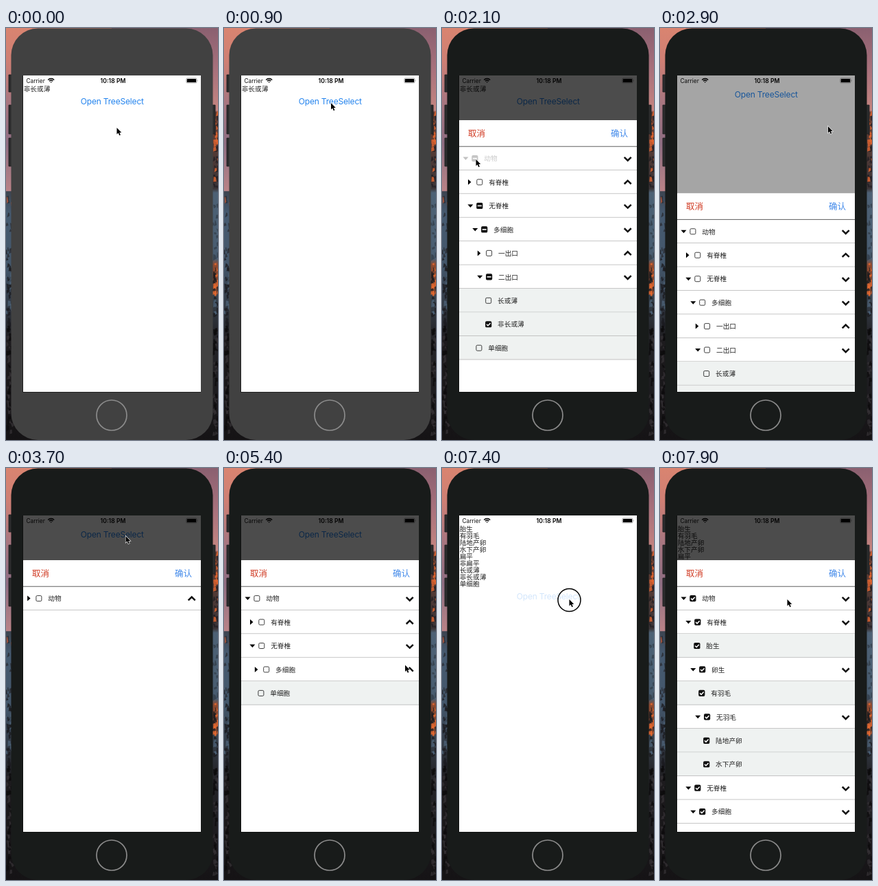
An HTML page that plays this animation: 309 px wide and 599 px high, repeating every 8000 ms.

```html
<!DOCTYPE html>
<html lang="zh-CN">
<head>
<meta charset="utf-8">
<title>TreeSelect</title>
<style>
  html, body { margin: 0; width: 100%; height: 100%; overflow: hidden; background: #1b1a1c; }
  svg { display: block; width: 309px; height: 599px; }
  text { font-family: "Noto Sans CJK SC", "Noto Sans CJK", sans-serif; white-space: pre; }
  .ui { font-family: Inter, "Liberation Sans", sans-serif; }
  .name { font-size: 9.66px; fill: #222; }
  .head { font-size: 12.5px; }
</style>
</head>
<body>
<svg viewBox="0 0 309 599" xmlns="http://www.w3.org/2000/svg">
  <defs>
    <clipPath id="screen"><rect x="25" y="69" width="259" height="460"/></clipPath>
    <linearGradient id="west" x2="0" y2="1">
      <stop offset="0" stop-color="#d98470"/>
      <stop offset=".08" stop-color="#cf7f74"/>
      <stop offset=".18" stop-color="#a87680"/>
      <stop offset=".28" stop-color="#8f6d82"/>
      <stop offset=".35" stop-color="#a87b85"/>
      <stop offset=".395" stop-color="#b98287"/>
      <stop offset=".397" stop-color="#3c4450"/>
      <stop offset=".45" stop-color="#465a70"/>
      <stop offset=".58" stop-color="#43566a"/>
      <stop offset=".7" stop-color="#2b2f37"/>
      <stop offset=".76" stop-color="#1d1b1e"/>
      <stop offset="1" stop-color="#151315"/>
    </linearGradient>
    <linearGradient id="east" x2="0" y2="1">
      <stop offset="0" stop-color="#8a6070"/>
      <stop offset=".1" stop-color="#a8717c"/>
      <stop offset=".2" stop-color="#c58580"/>
      <stop offset=".205" stop-color="#6b3f32"/>
      <stop offset=".39" stop-color="#3b3538"/>
      <stop offset=".4" stop-color="#4d6175"/>
      <stop offset=".56" stop-color="#485c70"/>
      <stop offset=".575" stop-color="#8f4a30"/>
      <stop offset=".64" stop-color="#6b3f30"/>
      <stop offset=".65" stop-color="#37424e"/>
      <stop offset=".74" stop-color="#25252a"/>
      <stop offset="1" stop-color="#151315"/>
    </linearGradient>
  </defs>

  <rect width="155" height="599" fill="url(#west)"/>
  <rect x="154" width="155" height="599" fill="url(#east)"/>
  <g id="rocks"></g>

  <path d="M4 68h6v25h-6zM4 112h6v42h-6zM4 160h6v41h-6zM299 112h6v42h-6z" fill="#2b2c2d" stroke="#1d1e1f" stroke-width=".8"/>
  <rect id="shell" x="7.5" y=".6" width="294" height="598.4" rx="39"/>
  <circle cx="154" cy="563" r="22" fill="none" stroke="#8b8b8b" stroke-width="1.7"/>
  <rect x="24.3" y="69" width="259.7" height="460.6" fill="#0c0c0c"/>

  <g clip-path="url(#screen)">
    <rect x="25" y="69" width="259" height="460" fill="#fff"/>
    <text class="ui" x="29.5" y="79.5" font-size="8.4" fill="#111">Carrier</text>
    <text class="ui" x="156" y="79.7" font-size="8.6" font-weight="600" text-anchor="middle">10:18 PM</text>
    <g fill="none" stroke="#000" stroke-width="1.4">
      <path d="M61.2 75.4a6.4 6.4 0 0 1 9 0M63 77.3a4 4 0 0 1 5.4 0"/>
      <path d="M64.3 78.2h2.8l-1.4 1.5z" fill="#000" stroke="none"/>
    </g>
    <rect x="262.8" y="73" width="15.2" height="7" rx="1.6" fill="none" stroke="#777" stroke-width=".6"/>
    <rect x="263.7" y="73.9" width="13.4" height="5.2" rx=".9"/>
    <path d="M278.9 75.2q1.2 1.3 0 2.6z" fill="#777"/>

    <g id="list"></g>
    <text id="open" class="ui" x="154.8" text-anchor="middle" font-size="12" letter-spacing="-.18" fill="#2484ee">Open TreeSelect</text>
    <rect id="shade" x="25" y="69" width="259" height="460"/>

    <g id="panel">
      <rect x="25" y="134" width="259" height="395" fill="#fff"/>
      <g id="rows"></g>
      <text class="head" x="38" y="157.6" fill="#d03a22">取消</text>
      <text class="head" id="ok" x="246" y="157.6" fill="#4189ea">确认</text>
      <rect x="25" y="171.7" width="259" height="1.1" fill="#6e6e6e"/>
    </g>
  </g>

  <g id="cursor">
    <circle id="ring" r="16.5" cy="1" fill="none" stroke="#000" stroke-width="1.5"/>
    <path d="M0 0V10.8L2.5 8.6 4.3 12.7 6.1 11.9 4.4 8H7.7Z" transform="scale(.88)" stroke="#fff" stroke-width="1.3" paint-order="stroke"/>
  </g>
</svg>

<script>
const LOOP = 8000, STEP = 100, SLIDE = 300;
const ROW = 34.45, TOP = 172.4, DROP = 395;
const $ = id => document.getElementById(id);

const tree = ['动物',
  ['有脊椎', ['胎生'],
    ['卵生', ['有羽毛'], ['无羽毛', ['陆地产卵'], ['水下产卵']]]],
  ['无脊椎',
    ['多细胞',
      ['一出口', ['扁平'], ['非扁平']],
      ['二出口', ['长或薄'], ['非长或薄']]],
    ['单细胞']]];

const leaves = ([name, ...kids]) => kids.length ? kids.flatMap(leaves) : [name];
const ALL = leaves(tree), ONE = ['非长或薄'];

// time, open branches ('*' = every one), checked leaves
const views = [
  [0, '动物 无脊椎 多细胞 二出口', ONE],
  [2200, '动物 无脊椎 多细胞 二出口', []],
  [3300, '', []],
  [4300, '动物', []],
  [4900, '动物 无脊椎', []],
  [5600, '动物 无脊椎 多细胞', []],
  [6300, '动物 无脊椎 多细胞', ALL],
  [7450, '*', ALL]
];
const pages = [[0, ONE], [2800, []], [7100, ALL]];
const slides = [[1063, 1], [2790, 0], [3340, 1], [7080, 0], [7480, 1]];

// mouse down, mouse up, what it dims
const clicks = [
  [1000, 1050, 'open'], [2000, 2095, 'root'], [2700, 2750, 'ok'],
  [3200, 3350, 'open'], [4200, 4250], [4800, 4850], [5500, 5550],
  [6200, 6250, 'root'], [6900, 7050, 'ok'], [7400, 7450, 'open']
];
const path = [
  [0, 161.5, 145], [900, 156, 109], [1200, 156, 109], [1900, 49.5, 191],
  [2150, 49.5, 191], [2700, 258, 151], [2800, 258, 151], [3200, 174.5, 99],
  [3700, 174.5, 99], [4200, 268, 189], [4400, 268, 189], [4800, 267, 257],
  [4950, 267, 257], [5300, 264, 286.5], [5650, 264, 286.5], [6150, 48, 189],
  [6350, 48, 189], [6850, 252, 151], [7050, 252, 151], [7400, 185.5, 191], [LOOP, 185.5, 191]
];

const last = (list, t) => list.filter(e => e[0] <= t).pop();

function checkbox(x, y, state) {
  if (state === 'none') {
    return `<rect x="${x - 4}" y="${y - 4}" width="8" height="8" rx="1.6" fill="none" stroke="#2a2a2a" stroke-width=".9"/>`;
  }
  const mark = state === 'all'
    ? `<path d="M${x - 2.7} ${y}l2 2 3.6-3.8" fill="none" stroke="#fff" stroke-width="1.5"/>`
    : `<rect x="${x - 3}" y="${y - .8}" width="6" height="1.6" fill="#fff"/>`;
  return `<rect x="${x - 4.6}" y="${y - 4.6}" width="9.2" height="9.2" rx="1.9" fill="#111"/>${mark}`;
}

function rowsFor(open, checked) {
  const opened = open.split(' ');
  let html = '', count = 0;
  const add = (node, depth) => {
    const [name, ...kids] = node;
    const leaf = !kids.length;
    const down = open === '*' || opened.includes(name);
    const top = TOP + ROW * count++, y = top + 17.2;
    const x = 61.3 + 6.9 * depth - (leaf ? 7.8 : 0);
    const own = leaves(node), hits = own.filter(n => checked.includes(n)).length;
    const state = hits === own.length ? 'all' : hits ? 'half' : 'none';
    const tri = x - 26.8;
    if (leaf) html += `<rect x="25" y="${top}" width="259" height="${ROW}" fill="#eff2f1"/>`;
    html += `<rect x="25" y="${top + ROW - .9}" width="259" height=".8" fill="#b8b8b8"/>`;
    html += `<g${depth ? '' : ' id="root"'}>`;
    if (!leaf) {
      html += down ? `<path d="M${tri - 4} ${y - 2}h8l-4 4.5z"/>`
                   : `<path d="M${tri - 3.4} ${y - 4}v8l4.5-4z"/>`;
    }
    html += checkbox(x - 13.4, y, state) +
      `<text class="name" x="${x}" y="${y + 3.7}">${name}</text></g>`;
    if (!leaf) {
      const s = down ? 1 : -1;
      html += `<path d="M265.7 ${y + .5 - 2.2 * s}l5 ${4.8 * s} 5 ${-4.8 * s}" fill="none" stroke="#111" stroke-width="2.5"/>`;
      if (down) kids.forEach(k => add(k, depth + 1));
    }
  };
  add(tree, 0);
  return html;
}

function cursorAt(t) {
  const i = path.findIndex(p => p[0] > t);
  const [t0, x0, y0] = path[i - 1], [t1, x1, y1] = path[i];
  const p = (t - t0) / (t1 - t0), e = p * p * (3 - 2 * p);
  return [x0 + (x1 - x0) * e, y0 + (y1 - y0) * e];
}

function dim(t, id) {
  const c = clicks.filter(c => c[2] === id && c[0] <= t).pop();
  if (!c) return 1;
  return t < c[1] ? .2 : Math.min(1, .2 + (t - c[1]) * .0075);
}

// panel travel and backdrop strength, both 0 to 1
function sheet(t) {
  const s = last(slides, t);
  if (!s) return [0, 0];
  const p = Math.min(1, (t - s[0]) / SLIDE);
  const move = p < .5 ? 2 * p * p : 1 - 2 * (1 - p) ** 2;
  const fade = 1 - (1 - p) ** 1.5;
  return s[1] ? [move, fade] : [1 - move, 1 - fade];
}

function paintRocks() {
  let seed = 11;
  const rnd = () => (seed = seed * 16807 % 2147483647) / 2147483647;
  // left edge, top, height, colour, how many
  const bands = [
    [0, 240, 100, '#2a2d35', 10], [0, 238, 20, '#b5573a', 2],
    [0, 320, 110, '#1b1c21', 28], [0, 350, 70, '#4d6378', 9],
    [301, 118, 115, '#221f24', 26], [301, 118, 100, '#e2652f', 16],
    [301, 238, 100, '#333e4b', 12], [301, 342, 48, '#ea6a30', 12],
    [301, 345, 80, '#1d1d21', 16], [301, 390, 40, '#4d6378', 5],
    [0, 430, 165, '#333033', 22], [301, 430, 165, '#333033', 22],
    [0, 430, 165, '#0c0b0c', 22], [301, 430, 165, '#0c0b0c', 22]
  ];
  const sliver = (x, y, h, fill) =>
    `<path d="M${x + rnd() * 7} ${y + rnd() * h}l${1 + rnd() * 3} ${rnd() * 4 - 2} ${rnd() * 2} ${2 + rnd() * 5} ${-2 - rnd() * 3} ${rnd() * 3}z" fill="${fill}" opacity=".8"/>`;
  $('rocks').innerHTML = bands.map(([x, y, h, fill, n]) =>
    Array.from({ length: n }, () => sliver(x, y, h, fill)).join('')).join('');
}

let view, page;
function draw(t) {
  const v = last(views, t), pg = last(pages, t);
  if (v !== view) {
    view = v;
    $('rows').innerHTML = rowsFor(v[1], v[2]);
  }
  if (pg !== page) {
    page = pg;
    $('list').innerHTML = pg[1].map((n, i) =>
      `<text class="name" x="25.7" y="${92.2 + 10 * i}">${n}</text>`).join('');
    $('open').setAttribute('y', 101.2 + 10 * pg[1].length);
  }
  $('shell').setAttribute('fill', t < 1000 ? '#414141' : '#181b1a');

  const [move, fade] = sheet(t);
  $('panel').setAttribute('transform', `translate(0 ${DROP * (1 - move)})`);
  $('shade').setAttribute('opacity', .7 * fade);
  for (const id of ['open', 'root', 'ok']) $(id).setAttribute('opacity', dim(t, id));

  $('cursor').setAttribute('transform', `translate(${cursorAt(t)})`);
  $('ring').setAttribute('visibility', clicks.some(c => t >= c[0] && t < c[1]) ? 'visible' : 'hidden');
}

function tick() {
  draw(Math.floor(performance.now() % LOOP / STEP) * STEP);
  requestAnimationFrame(tick);
}
paintRocks();
draw(0);
requestAnimationFrame(tick);
</script>
</body>
</html>
```
